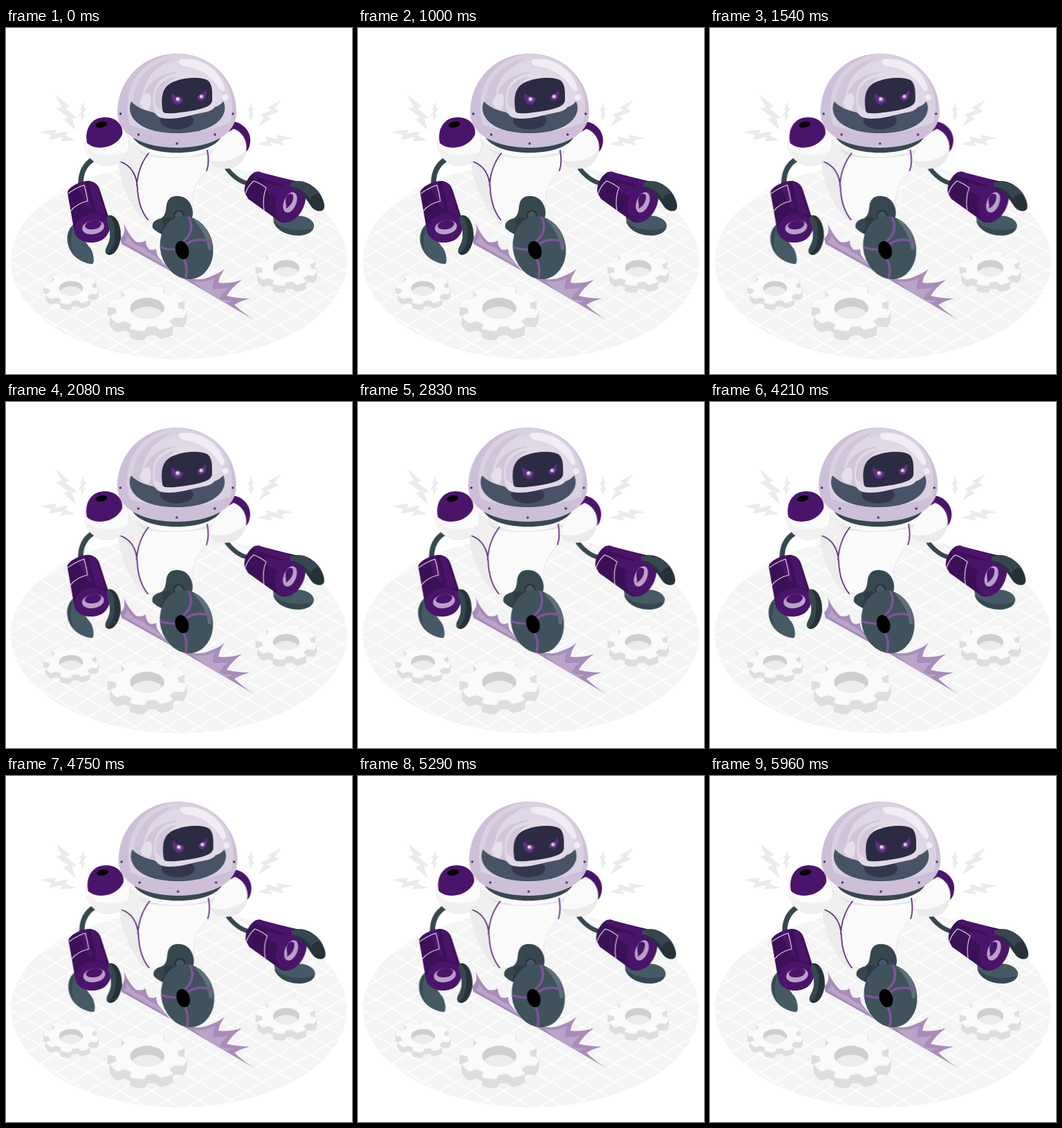
Write an HTML page that moves like this. It is 500 px wide and 500 px high and loops after 6000 ms.

```html
<!DOCTYPE html>
<html lang="en">
<head>
<meta charset="utf-8">
<title>Shaking robot</title>
<style>
  html, body { margin: 0; width: 100%; height: 100%; overflow: hidden; background: #fff; }
  svg { display: block; width: 100vw; height: 100vh; }
  path, ellipse, circle { stroke-linecap: round; stroke-linejoin: round; }
  .white { fill: #fafafa; }
  .pale { fill: #ebebeb; }
  .shade { fill: #e0e0e0; }
  .steel { fill: #455a64; }
  .slate { fill: #37474f; }
  .ink { fill: #263238; }
  .violet { fill: #4b146b; }
  .plum { fill: #3c1056; }
  .lilac { fill: #b9a1c9; }
  .line { fill: none; stroke: #e4dbe9; stroke-width: 1.1; }
  .seam { fill: none; stroke: #622f82; stroke-width: 1.8; }
  .tube { fill: none; stroke: #37474f; stroke-width: 7.5; }
  .edge { stroke: #e0e0e0; stroke-width: .8; }
  .band { fill: none; stroke: #80559a; stroke-width: 3.4; }
</style>
</head>
<body>
<svg viewBox="0 0 500 500">
  <defs>
    <clipPath id="floorClip"><ellipse cx="250" cy="337" rx="243" ry="142"/></clipPath>
    <clipPath id="wheelClip"><ellipse cx="261" cy="317.500" rx="38" ry="46" transform="rotate(-14 261 317.500)"/></clipPath>
    <clipPath id="domeClip"><path id="domeShape" d="M161 122C161 74 199 37 247 37C295 37 333 74 333 122C333 154 297 173 247 173C197 173 161 154 161 122Z"/></clipPath>
  </defs>

  <g clip-path="url(#floorClip)">
    <rect y="190" width="500" height="300" fill="#f4f4f4"/>
    <path id="grid" fill="none" stroke="#fff" stroke-width="1.5"/>
  </g>
  <g id="bolts" fill="#ebebeb"></g>
  <g id="gears"></g>

  <!-- skid spray -->
  <g fill="#a78cb9">
    <path d="M165 304Q174 297 170 282Q177 299 188 309Q197 311 202 307Q202 315 207 320Q213 322 217 319Q217 328 222 333L237 351L167 312Z"/>
    <path d="M257 360Q280 367 296 359Q309 354 316 348Q308 359 307 368Q323 370 341 364Q325 376 319 387Q335 391 352 391Q340 394 330 400Q344 413 362 424L258 363Z"/>
    <path fill="#b9a4c8" d="M169 309Q177 306 174 299Q181 310 190 315Q200 317 205 324Q213 325 232 345ZM270 366Q289 369 302 361Q298 371 299 377Q311 378 322 375Q310 385 309 391Q317 394 328 394L319 398Q296 388 270 366Z"/>
  </g>

  <g id="robot">
    <path class="tube" d="M127 189C113 197 108 209 108 225"/>
    <path class="tube" style="stroke-width:6.5" d="M320 204C328 214 338 223 352 225"/>

    <!-- left forearm -->
    <path class="steel" d="M97 284C87 293 85 311 95 325C102 335 116 341 125 341C129 338 126 321 120 316L106 296Z"/>
    <path class="slate" d="M94 288C87 300 90 316 99 328C91 316 93 301 97 290Z"/>
    <path class="plum" d="M89 239C87 231 108 220 121 221C131 223 134 229 136 235L150 279C151 297 144 308 126 310C110 311 99 302 98 290Z"/>
    <path class="violet" d="M102 226Q108 221 114 222L124 260Q118 261 116 255ZM120 223Q128 222 131 229L144 270L130 267Z"/>
    <ellipse class="violet" cx="124.500" cy="289" rx="26" ry="20.500" transform="rotate(-12 124.500 289)"/>
    <ellipse class="lilac" cx="126" cy="288" rx="16" ry="10" transform="rotate(-10 126 288)"/>
    <path class="violet" d="M114 286C116 277 135 275 138 282C137 289 130 291 124 291C118 291 114 289 114 286Z"/>
    <path class="line" d="M90 239Q101 231 113 227Q116 237 118 250Q101 254 93 265"/>
    <path class="ink" d="M147 271C158 267 167 284 166 302C164 318 157 328 149 328C142 327 143 320 146 316C152 305 152 294 147 283Z"/>
    <path class="slate" d="M146 272C153 270 159 285 157 302C156 315 152 322 146 326C142 323 145 317 147 313C152 303 151 292 146 281Z"/>

    <!-- right forearm -->
    <path class="steel" d="M386 271C386 288 401 300 422 300C437 300 446 293 445 284C442 275 432 271 418 271Z"/>
    <path class="slate" d="M386 278C395 290 419 296 444 289C438 299 425 301 411 298C398 296 388 288 386 278Z"/>
    <path class="plum" d="M345 238C343 225 352 212 360 208L418 221C431 222 435 237 430 254C425 274 410 285 396 280L350 247Z"/>
    <path class="violet" d="M358 210Q363 205 370 209L424 223L408 230L367 216Q359 216 358 210ZM374 224L405 231L394 245L377 236Z"/>
    <ellipse class="violet" cx="411" cy="251" rx="20.500" ry="30.500" transform="rotate(22 411 251)"/>
    <ellipse class="lilac" cx="410.500" cy="252" rx="9" ry="15.500" transform="rotate(22 410.500 252)"/>
    <path class="violet" d="M404 250C404 240 412 237 415 242C416 250 411 258 404 261C406 257 404 255 404 250Z"/>
    <path class="line" d="M346 239Q349 229 358 221Q367 224 376 231Q370 245 373 264"/>
    <path class="ink" d="M411 225C425 216 442 225 452 237C459 247 462 258 459 262C455 267 446 264 442 259C434 248 428 235 411 229Z"/>
    <path class="slate" d="M411 224C425 217 442 226 453 239C447 239 441 242 440 248C433 237 425 231 411 229Z"/>

    <!-- torso -->
    <path class="white edge" d="M163 185C161 211 177 255 198 275C209 279 223 278 234 274L270 263C267 239 274 222 290 207C297 196 293 181 292 166L180 160Z"/>
    <path class="pale" d="M163 192C183 199 188 214 189 232C190 251 197 267 205 277L198 275C177 255 162 212 163 192Z"/>
    <path fill="#f0f0f0" d="M169 158L206 178C196 193 190 207 189 222C186 207 178 198 166 193Z"/>
    <path class="shade" d="M183 168C205 194 286 192 313 166L310 176C284 190 215 191 196 182Z" opacity=".75"/>
    <path class="seam" d="M165 193C182 199 189 213 190 232C191 252 197 267 205 277M206 181C195 195 190 211 189 228M291 177C293 188 293 198 290 206"/>

    <!-- shoulders -->
    <path class="violet" d="M326 135C343 136 354 150 353 164C352 174 349 178 345 180L321 155Z"/>
    <path class="white edge" d="M309 158L329 146C344 151 350 168 346 181C341 199 327 205 313 202Q299 202 294 191Q297 174 309 158Z"/>
    <path class="pale" d="M294 191C310 196 336 190 347 176C344 195 329 205 314 203C304 203 297 199 294 191Z"/>
    <circle class="white edge" cx="146" cy="167" r="32"/>
    <path class="pale" d="M117 171C128 188 156 186 177 178C172 193 160 199 147 199C132 199 120 189 117 171Z" opacity=".6"/>
    <path class="violet" d="M117 166C113 145 124 129 143 129C160 129 170 141 168 154C160 173 130 179 117 166Z"/>
    <ellipse cx="138" cy="139.500" rx="8.500" ry="4.300" transform="rotate(-12 138 139.500)"/>

    <!-- fork and wheel -->
    <path class="slate" d="M232 255C235 243 244 241 255 244C269 249 273 268 268 276L246 294C236 304 220 298 212 289C210 281 216 277 224 275C231 271 231 262 232 255Z"/>
    <path class="ink" d="M226 276Q235 271 242 276L239 298Q230 303 222 296Q230 287 226 276Z" opacity=".55"/>
    <circle class="ink" cx="250" cy="271" r="8"/>
    <path class="steel" d="M244 270Q250 260 256 270L255 277H245Z"/>
    <g clip-path="url(#wheelClip)">
      <path fill="#40535d" d="M215 265H305V370H215Z"/>
      <path fill="#5f717a" d="M270 276Q292 282 297 312Q299 324 292 320Q290 297 270 276Z"/>
      <path class="band" d="M221 316Q234 321 247 320M261 312Q278 300 302 312M257 308Q274 294 264 272M257 334Q264 348 259 365"/>
    </g>
    <ellipse cx="254.500" cy="321" rx="9.500" ry="13.500" transform="rotate(-18 254.500 321)"/>

    <!-- neck -->
    <path class="slate" d="M181 151C186 190 308 190 313 151Z"/>

    <!-- dome -->
    <use href="#domeShape" fill="#cdbfd7"/>
    <g clip-path="url(#domeClip)">
      <path fill="#d9d0e0" d="M179 140C165 89 192 43 247 37C308 41 337 88 324 137Q250 165 179 140Z"/>
      <path fill="#d0c4d9" d="M183 118C181 81 202 52 239 44C215 59 201 82 198 112Z"/>
      <path fill="#dfd7e5" d="M197 111C195 74 219 48 252 47C292 48 316 79 316 115Z"/>
      <path fill="#485367" d="M181 106C173 124 187 152 247 152C306 152 323 124 314 106Q309 112 303 114L214 122Q190 117 181 106Z"/>
      <ellipse cx="247" cy="134" rx="24" ry="12.500" fill="#34364d"/>
    </g>

    <!-- head -->
    <path fill="#d0c4d9" d="M198 111C198 83 218 67 246 64L230 128C218 127 209 120 198 111Z"/>
    <path fill="#e1dae6" d="M214 118C208 88 219 69 248 65C281 60 304 70 304 95C306 113 302 119 286 122C266 126 252 131 235 131C222 131 215 127 214 118Z"/>
    <path fill="#d2c7db" d="M216 112C212 90 222 74 247 70C229 80 222 96 225 119Z"/>
    <path fill="#e5dfe9" d="M193 109C195 99 201 94 207 94C211 100 210 111 207 117C203 120 196 114 193 109Z"/>
    <path fill="#2d2b43" d="M226 117C223 94 229 82 244 77C259 71 283 70 292 76C299 82 298 95 298 104C298 112 287 116 272 119C254 122 242 124 232 123C228 123 226 121 226 117Z"/>
    <path fill="#5f2f83" d="M239 94Q247 100 256 101Q256 110 248 111Q239 110 239 94ZM276 99Q283 97 289 89Q291 101 284 105Q277 107 276 99Z"/>
    <g fill="#a277bd"><circle cx="248.500" cy="103" r="3.600"/><circle cx="282.500" cy="99" r="3.300"/></g>
    <g fill="#eee2f3"><circle cx="248" cy="102.500" r="2"/><circle cx="282" cy="99" r="1.800"/></g>

    <!-- glass gloss and rivets -->
    <path fill="#f1edf4" d="M252 45C281 41 309 60 316 86C317 93 312 93 308 87C297 70 281 58 257 55C249 53 248 46 252 45Z"/>
    <circle cx="317" cy="100" r="4.500" fill="#f1edf4"/>
    <g id="rivets" fill="#54277a"></g>
  </g>
</svg>
<script>
  const el = id => document.getElementById(id);
  const pts = list => 'M' + list.map(p => p.map(v => v.toFixed(1)).join(' ')).join('L') + 'Z';

  // isometric floor lines
  let grid = '';
  for (let x = -480; x < 1000; x += 46) {
    grid += `M${x} 190l520 300M${x} 190l-520 300`;
  }
  el('grid').setAttribute('d', grid);

  const boltShape = [[0, 0], [.42, .16], [.4, .04], [.74, .18], [.7, .06], [1, 0],
                     [.6, -.13], [.64, 0], [.28, -.16], [.32, -.02]];
  function bolt(x1, y1, x2, y2, flip = 1) {
    const dx = x2 - x1, dy = y2 - y1;
    const at = ([u, v]) => [x1 + u * dx - flip * v * dy, y1 + u * dy + flip * v * dx];
    return `<path d="${pts(boltShape.map(at))}"/>`;
  }
  el('bolts').innerHTML =
    bolt(72, 97, 101, 148, -1) + bolt(49, 150, 101, 162, -1) + bolt(113, 106, 109, 136) +
    bolt(398, 104, 365, 142) + bolt(414, 159, 363, 168) + bolt(353, 107, 354, 136, -1);

  function gear(cx, cy, r, depth, phase) {
    const squash = .58, rim = [];
    const spots = [[-15, .8], [-11, 1], [0, 1.01], [11, 1], [15, .8], [22.5, .79]];
    for (let k = 0; k < 8; k++) {
      for (const [deg, f] of spots) {
        const a = (phase + k * 45 + deg) * Math.PI / 180;
        rim.push([cx + r * f * Math.cos(a), cy + r * f * squash * Math.sin(a)]);
      }
    }
    const top = pts(rim);
    let side = '';
    for (let d = depth; d > 0; d--) {
      side += `<path d="${top}" transform="translate(0 ${d})"/>`;
    }
    const hx = r * .43, hy = r * .265, id = 'hole' + cx;
    const hole = `cx="${cx}" cy="${cy}" rx="${hx}" ry="${hy}"`;
    return `<g fill="#dedede">${side}</g>
      <path d="${top}" fill="#fafafa" stroke="#e6e6e6" stroke-width=".6"/>
      <clipPath id="${id}"><ellipse ${hole}/></clipPath>
      <ellipse ${hole} fill="#cfcfcf"/>
      <g clip-path="url(#${id})"><ellipse ${hole} fill="#ececec" transform="translate(0 ${depth})"/></g>`;
  }
  el('gears').innerHTML =
    gear(94, 376, 40, 8, 12) + gear(405, 347, 44.5, 10, 15) + gear(204, 405, 57.5, 13, 15);

  el('rivets').innerHTML = [[165.5, 124], [328, 124], [191.5, 154], [302, 154], [247, 167]]
    .map(([x, y]) => `<circle cx="${x}" cy="${y}" r="1.7"/>`).join('');

  // sideways shake, evenly spaced steps
  const shake = [0, -1, 2, -4, 4, -4, 4, -4, 2, -1, 0];
  el('robot').animate(
    shake.map(x => ({ transform: `translate(${x}px, 0px)` })),
    { duration: 6000, iterations: Infinity, easing: 'linear' }
  );
</script>
</body>
</html>
```
